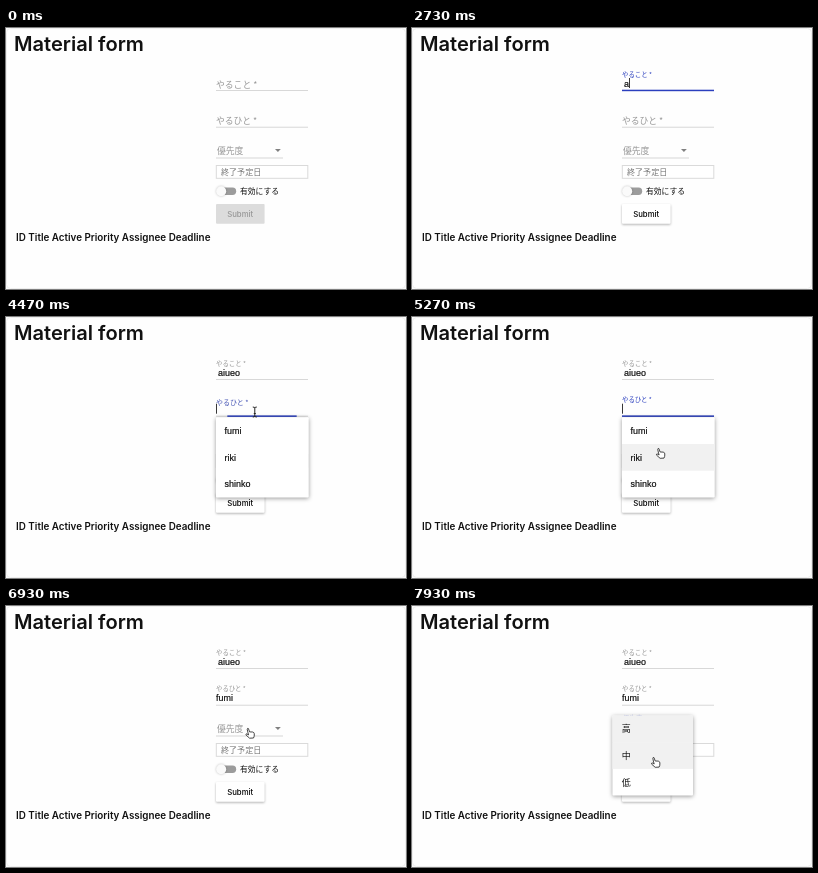
Recreate the animation shown at these times as an HTML page. Size 400 px wide and 261 px high, loop 8 s.

```html
<!DOCTYPE html>
<html lang="ja">
<head>
<meta charset="utf-8">
<title>Material form</title>
<style>
html, body { margin: 0; width: 100%; height: 100%; overflow: hidden; background: #fff; }
svg { display: block; width: 400px; height: 261px; }
text { font-family: "Liberation Sans", Arial, sans-serif; font-size: 8.95px; fill: #111; white-space: pre; }
.entry { stroke: #111; stroke-width: .2px; }
.head { font-family: Inter, sans-serif; font-weight: 600; }
.jp { font-family: "Noto Sans CJK JP", "Noto Sans CJK", sans-serif; }
.line { fill: #d8d8d8; }
.raised { filter: drop-shadow(0 .8px .8px rgba(0,0,0,.25)); }
.menu { filter: drop-shadow(0 1.5px 2px rgba(0,0,0,.4)); }
</style>
</head>
<body>
<svg id="stage" viewBox="0 0 400 261"></svg>
<script>
const LOOP = 8000, TICK = 1000 / 15;
const BLUE = [43, 63, 190], GRAY = [152, 152, 152];
const NAMES = ['fumi', 'riki', 'shinko'], LEVELS = ['高', '中', '低'];
const stage = document.getElementById('stage');

function add(tag, attrs = {}, parent = stage, text) {
  const el = document.createElementNS('http://www.w3.org/2000/svg', tag);
  set(el, attrs);
  if (text) el.textContent = text;
  parent.appendChild(el);
  return el;
}
function set(el, attrs) {
  for (const k in attrs) el.setAttribute(k, attrs[k]);
}
const show = (el, on) => set(el, { opacity: +on });
const clamp = v => Math.max(0, Math.min(1, v));
const ease = v => v * v * (3 - 2 * v);
const ramp = (t, start, len) => ease(clamp((t - start) / len));
const mix = (a, b, k) => a + (b - a) * k;
const blend = (a, b, k) => `rgb(${a.map((v, i) => Math.round(mix(v, b[i], k)))})`;

// A floating label with its underline, text and caret
function makeField(y, label, width = 92, labelX = 210, labelY = y - 2.3) {
  const f = { y, width, labelX, labelY };
  f.label = add('text', { class: 'jp' }, stage, label);
  add('rect', { class: 'line', x: 210, y, width, height: 1 });
  f.bar = add('rect', { y: y - .3, height: 1.5, fill: blend(BLUE, BLUE, 0) });
  f.text = add('text', { class: 'entry', y: y - 3.5 });
  f.caret = add('rect', { y: y - 12, width: .9, height: 10, fill: '#222' });
  return f;
}
function drawField(f, up, focus, value = '', x = 210, caret = false) {
  set(f.label, {
    transform: `translate(${f.labelX} ${f.labelY - 11.1 * up}) scale(${mix(1, .73, up)})`,
    style: `font-size:8.8px;fill:${blend(GRAY, BLUE, focus)}`
  });
  const w = f.width * focus;
  set(f.bar, { x: 210 + (f.width - w) / 2, width: w });
  f.text.textContent = value;
  set(f.text, { x });
  set(f.caret, { x: x + (value ? f.text.getComputedTextLength() : 0) });
  show(f.caret, caret);
}

// A drop-down list with shaded rows
function makeMenu(x, y, width, items, textX, cls) {
  const g = add('g'), rowH = 26.7;
  const box = add('rect', { class: 'menu', x, y, width, rx: 1, fill: '#fff' }, g);
  const rows = items.map((s, i) => {
    const row = add('g', {}, g);
    const shade = add('rect', { x, y: y + i * rowH, width, height: rowH, fill: '#f1f1f1' }, row);
    add('text', { class: cls, x: textX, y: y + i * rowH + 16.7 }, row, s);
    return { row, shade };
  });
  return { g, box, rows, x, y, width, rowH };
}
function drawMenu(m, open, count, pointer, active = -1) {
  const cx = m.x + m.width / 2;
  set(m.g, {
    opacity: open,
    transform: `translate(${cx} ${m.y}) scale(1 ${mix(.8, 1, open)}) translate(${-cx} ${-m.y})`
  });
  set(m.box, { height: m.rowH * count });
  m.rows.forEach(({ row, shade }, i) => {
    const top = m.y + i * m.rowH;
    show(row, i < count);
    show(shade, i === active || (pointer >= top && pointer < top + m.rowH));
  });
}

add('rect', { width: 400, height: 261, fill: '#fafafa' });
add('rect', { x: .5, y: .5, width: 399, height: 260, rx: 4, fill: '#fefefe', stroke: '#eeeeee' });
add('text', { class: 'head', x: 8, y: 22.5, style: 'font-size:20.1px' }, stage, 'Material form');
add('text', { class: 'head', x: 10, y: 213.2, style: 'font-size:9.85px' }, stage,
  'ID Title Active Priority Assignee Deadline');

const task = makeField(62, 'やること *');
const person = makeField(98.7, 'やるひと *');
const level = makeField(129.5, '優先度', 67, 210.9, 126);
add('path', { d: 'M269 121h5.8l-2.9 2.9z', fill: '#808080' });
add('rect', { x: 210.3, y: 137.5, width: 91.5, height: 12.8, fill: '#fff', stroke: '#dadada' });
add('text', { class: 'jp', x: 215, y: 147, style: 'font-size:8.05px;font-weight:500;fill:#777' }, stage, '終了予定日');
add('rect', { x: 211, y: 159.5, width: 19.2, height: 7.5, rx: 3.7, fill: '#9c9c9c' });
add('circle', { class: 'raised', cx: 215.2, cy: 163.2, r: 5, fill: '#fafafa' });
add('text', { class: 'jp', x: 234, y: 166, style: 'font-size:7.8px;font-weight:500' }, stage, '有効にする');
const button = add('rect', { x: 210, y: 176, width: 48.6, height: 19.7, rx: 1 });
const submit = add('text', { class: 'head', x: 221.2, y: 188.6 }, stage, 'Submit');

const nameMenu = makeMenu(210, 100.3, 92.7, NAMES, 218.6, 'entry');
const levelMenu = makeMenu(200.5, 109.5, 80.5, LEVELS, 209.8, 'jp');

const beam = add('path', {
  d: 'M-2-5Q0-5 0-4Q0-5 2-5M0-4V4M-2 5Q0 5 0 4Q0 5 2 5M-1 1.5H1',
  fill: 'none', stroke: '#222', 'stroke-width': 1
});
const hand = add('path', {
  d: 'M-2-.3L-2.8-4Q-2.7-5.2-1.6-4.7L-.4-1.3L2.7-1.2Q4.2-.8 4.3.6L4.2 3L3.5 4.8L-.4 5L-3.9 1.9Q-4.5.7-3.4.6L-1.4 1.7Z',
  fill: '#fff', stroke: '#333', 'stroke-width': .9, 'stroke-linejoin': 'round'
});

// Pointer path: time, x, y
const MOVES = [
  [930, 383, 57], [1130, 292, 57], [1270, 259, 56.8], [1465, 259, 56.8], [1530, 259.5, 56.5],
  [3800, 260, 57.5], [3870, 260, 57.5], [4270, 250, 92], [4600, 248, 97],
  [4930, 247, 122], [5270, 248.5, 136.3], [6000, 248.5, 136],
  [6270, 245, 117], [6400, 245, 118], [6600, 244, 127.2], [7670, 244, 127.2], [7930, 243.6, 156.3]
];
function pointerAt(t) {
  let i = MOVES.findIndex(m => m[0] > t);
  if (i < 0) i = MOVES.length;
  const a = MOVES[Math.max(0, i - 1)], b = MOVES[i] || a;
  const k = a === b ? 0 : clamp((t - a[0]) / (b[0] - a[0]));
  return [mix(a[1], b[1], k), mix(a[2], b[2], k)];
}

const KEYS = [2260, 2930, 3130, 3400, 3600];

function draw(t) {
  const typed = KEYS.filter(k => t >= k).length;
  const blink = t0 => (t - t0) % 1060 < 530;
  const taskOn = t >= 1730 && t < 4260;
  const taskUp = t >= 1730 ? ramp(t, 1660, 400) : 0;
  drawField(task, taskUp, taskOn ? taskUp : 0,
    'aiueo'.slice(0, typed), 212.1, taskOn && (t > 2590 || blink(1730)));

  const picked = t >= 6320, filtered = t >= 5525;
  const personOn = t >= 4260 && t < 6500;
  const personUp = ramp(t, 4200, 400);
  drawField(person, personUp, personOn ? personUp : 0,
    picked ? NAMES[0] : filtered ? NAMES[0][0] : '', 210,
    personOn && (filtered || t > 5190 || blink(4260)));
  const levelUp = ramp(t, 6960, 400);
  drawField(level, levelUp, levelUp);

  const ready = ramp(t, 2250, 270);
  set(button, {
    fill: blend([220, 220, 220], [255, 255, 255], ready),
    style: `filter:drop-shadow(0 1px 1px rgba(0,0,0,${.3 * ready}))`
  });
  set(submit, {
    style: `font-size:7.75px;font-weight:500;fill:${blend([150, 150, 150], [0, 0, 0], ready)}`
  });

  const [x, y] = pointerAt(t);
  const seen = (t >= 930 && t < 2200) || (t >= 3795 && t < 5525) || t >= 5995;
  drawMenu(nameMenu, ramp(t, 4240, 180) * (1 - ramp(t, 6300, 130)), filtered ? 1 : 3, seen ? y : -1);
  drawMenu(levelMenu, ramp(t, 6980, 220), 3, y, 0);

  const isHand = t > 4600 && y > 101;
  const place = { transform: `translate(${x} ${y})` };
  set(beam, place);
  set(hand, place);
  show(beam, seen && !isHand);
  show(hand, seen && isHand);
}

const start = performance.now();
function frame() {
  const t = (performance.now() - start) % LOOP;
  draw(Math.floor((t + 4) / TICK) * TICK + 4);
  requestAnimationFrame(frame);
}
draw(0);
frame();
</script>
</body>
</html>
```
